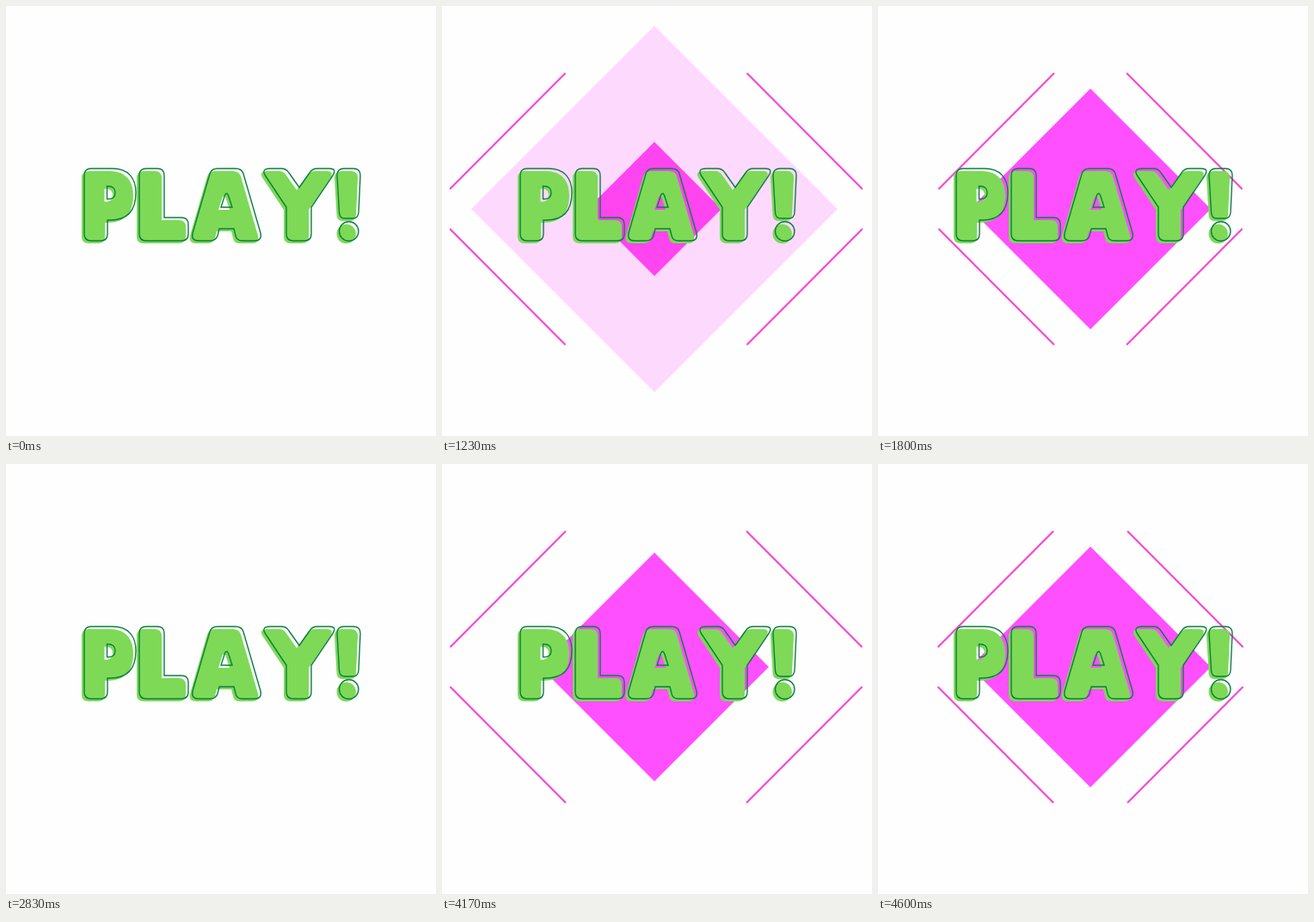
These frames come from a looping animation (500x500 px, 4.63 s). An HTML page with a canvas:

```html
<!DOCTYPE html>
<html lang="en">
<head>
<meta charset="utf-8">
<title>Play!</title>
<style>
  html, body { margin: 0; width: 100%; height: 100%; overflow: hidden; background: #fefefe; }
  canvas { display: block; width: 500px; height: 500px; }
</style>
</head>
<body>
<canvas id="stage" role="img" aria-label="PLAY!"></canvas>
<script>
const SIZE = 500, LOOP = 4630, CYCLE = 2830;
const CENTER = { x: 247, y: 236 };
const PINK = "#ff50ff", HOT_PINK = "#ff42ec", LINE_PINK = "#f848d2";
const GREEN = "#7ed957", DARK_GREEN = "#0b7f41";

const canvas = document.getElementById("stage");
const ctx = canvas.getContext("2d");
const ratio = window.devicePixelRatio || 1;
canvas.width = canvas.height = Math.round(SIZE * ratio);

// Lettering, one path per glyph
const word = new Path2D([
  // P
  "M99 189H124C142 189 151 200 151 217C151 238 141 249 121 249H118V265Q118 273 110 273H99Q91 273 91 265V197Q91 189 99 189Z",
  "M117.5 209.5V224.5C124 225 127 222 127 217C127 212 124 209 117.5 209.5Z",
  // L
  "M163 189H176Q184 189 184 197V246H204Q212 246 212 254V265Q212 273 204 273H163Q155 273 155 265V197Q155 189 163 189Z",
  // A
  "M246 189H267Q274 189 276 195L296 264Q298 273 289 273H275Q268 273 267 267L265 259H248L246 267Q244 273 237 273H224Q215 273 217 264L237 195Q239 189 246 189Z",
  "M254.5 220Q256.5 216 258.5 220L263 234H250Z",
  // Y
  "M307 189H320Q326 189 329 194L341 211L353 194Q356 189 362 189H376Q385 189 380 197L355 234V265Q355 273 347 273H334Q326 273 326 265V234L302 198Q296 189 307 189Z",
  // !
  "M393 189H404Q412 189 412 197L410 240Q409.500 247 403 247H394Q388 247 387.500 240L385 197Q385 189 393 189Z",
  "M387.500 262a11.200 11.200 0 1 0 22.400 0a11.200 11.200 0 1 0 -22.400 0Z"
].join(""));

const clamp = p => Math.min(1, Math.max(0, p));
const smooth = p => p * p * (3 - 2 * p);
const easeInOut = p => p < 0.5 ? 2 * p * p : 1 - 2 * (1 - p) * (1 - p);
const progress = (t, start, length) => clamp((t - start) / length);

// Eased value between [time, value] keys
function track(t, keys) {
  let value = keys[0][1];
  for (let i = 1; i < keys.length; i++) {
    const [t0, v0] = keys[i - 1], [t1, v1] = keys[i];
    if (t >= t0) value = v0 + (v1 - v0) * smooth(progress(t, t0, t1 - t0));
  }
  return value;
}

function diamond(half, color, alpha = 1) {
  const { x, y } = CENTER;
  ctx.globalAlpha = alpha;
  ctx.fillStyle = color;
  ctx.beginPath();
  ctx.moveTo(x, y - half);
  ctx.lineTo(x + half, y);
  ctx.lineTo(x, y + half);
  ctx.lineTo(x - half, y);
  ctx.fill();
  ctx.globalAlpha = 1;
}

// Two mirrored diagonals: inner end at x, outer end 134.5 px further out
function chevron(x, side) {
  for (const flip of [-1, 1]) {
    ctx.beginPath();
    ctx.moveTo(x, CENTER.y + flip * 158);
    ctx.lineTo(x + side * 134.5, CENTER.y + flip * 23);
    ctx.stroke();
  }
}

function drawLines(t) {
  const away = 140 * (1 - easeInOut(progress(t, 60, 500)));
  const push = easeInOut(progress(t, 1310, 505));
  ctx.save();
  ctx.beginPath();
  ctx.rect(8.5, 0, 481, SIZE);
  ctx.clip();
  ctx.strokeStyle = LINE_PINK;
  ctx.lineWidth = 2.2;
  chevron(143.5 - away + 61.5 * push, -1);
  chevron(354.5 + away - 65.5 * push, 1);
  ctx.restore();
}

function drawWord() {
  ctx.save();
  ctx.translate(-3, 3);
  ctx.fillStyle = GREEN;
  ctx.fill(word, "evenodd");
  ctx.restore();
  ctx.strokeStyle = DARK_GREEN;
  ctx.lineWidth = 1.4;
  ctx.stroke(word);
}

function draw(t) {
  ctx.setTransform(ratio, 0, 0, ratio, 0, 0);
  ctx.fillStyle = "#fefefe";
  ctx.fillRect(0, 0, SIZE, SIZE);
  if (t >= 60) drawLines(t);
  if (t >= 540) diamond(track(t, [[540, 0], [670, 83], [770, 83], [890, 78]]), HOT_PINK);
  if (t >= 1230) {
    const half = track(t, [[1230, 213], [1340, 133], [1440, 140]]);
    diamond(half, PINK, progress(t, 1215, 75));
  }
  drawWord();
}

function tick() {
  draw(performance.now() % LOOP % CYCLE);
  requestAnimationFrame(tick);
}
tick();
</script>
</body>
</html>
```
